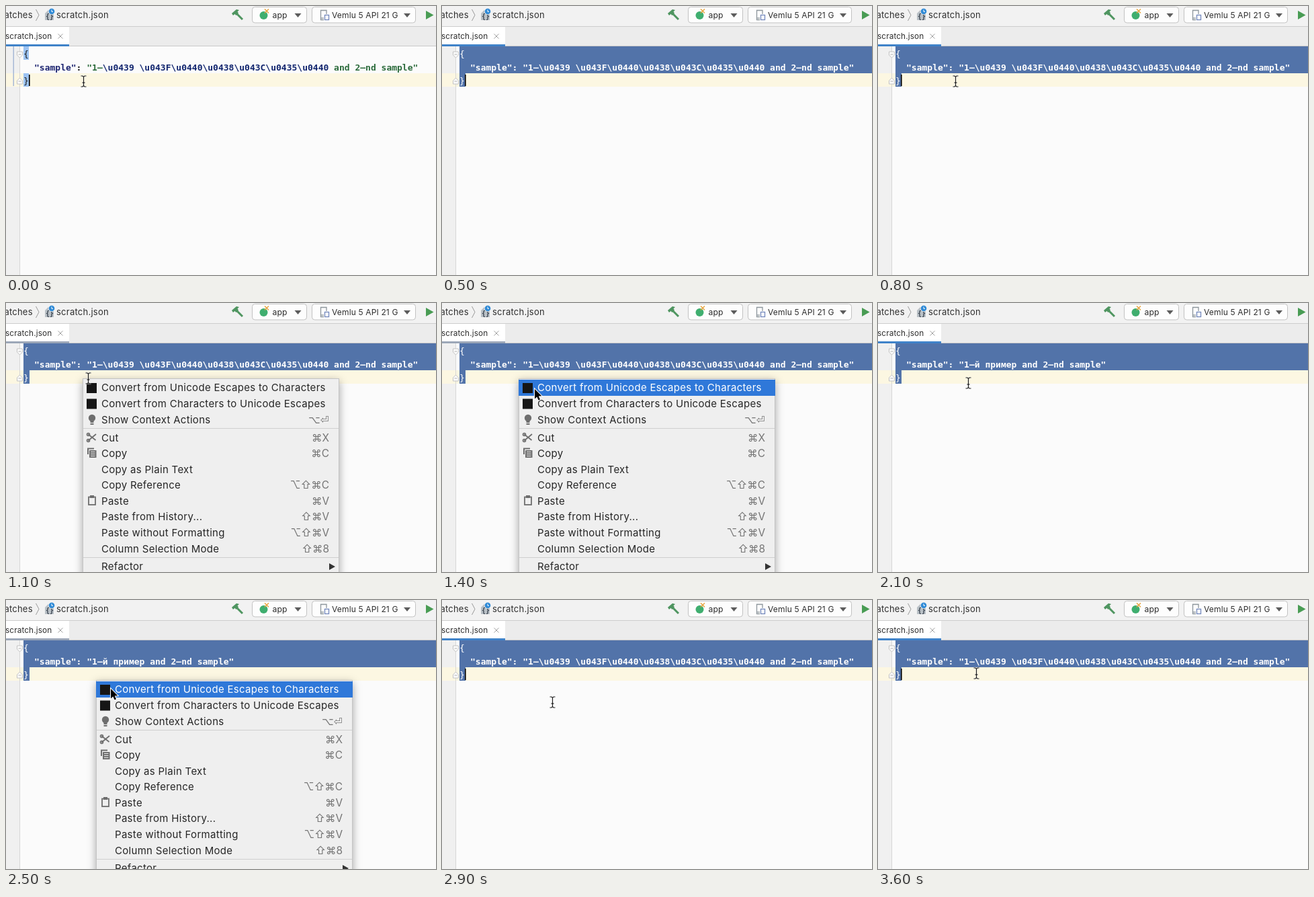
Write an HTML page with a canvas that moves like this. It is 640 px wide and 400 px high and loops after 3800 ms.

```html
<!DOCTYPE html>
<html lang="en">
<head>
<meta charset="utf-8">
<title>Unicode escapes in the editor</title>
<style>
  html, body { margin: 0; width: 100%; height: 100%; overflow: hidden; background: #fbfbfb; }
  canvas { display: block; width: 640px; height: 400px; }
</style>
</head>
<body>
<canvas id="stage" width="640" height="400"></canvas>
<script>
const ctx = document.getElementById('stage').getContext('2d');
const LOOP = 3800, TICK = 100;
const UI = 'Inter, "DejaVu Sans", sans-serif';
const SYMBOLS = '"DejaVu Sans", sans-serif';
const MONO = '"DejaVu Sans Mono", "Liberation Mono", monospace';
const ROW = 23.6, MENU_W = 382;

const ESCAPED = '\\u0439 \\u043F\\u0440\\u0438\\u043C\\u0435\\u0440';
const PLAIN = 'й пример';

// time, x, y of the pointer
const PATH = [
  [0, 115, 112], [1000, 115, 112], [1100, 122, 112], [1200, 133, 122],
  [1300, 138, 128], [1400, 138, 128], [1500, 137, 126], [1700, 134, 119],
  [2200, 134, 119], [2300, 138, 123], [2500, 156, 132], [2600, 162, 150],
  [2700, 165, 154], [2900, 164, 152], [3200, 163, 149], [3600, 146, 109], [3800, 146, 109]
];
const MENUS = [
  { from: 1000, to: 1500, x: 114, y: 113 },
  { from: 2200, to: 2800, x: 134, y: 120 }
];
const CARET_ON = [[0, 200], [500, 1000], [1500, 2100], [2800, 3300], [3600, 3800]];

// label, shortcut, centre offset from the menu top
const ITEMS = [
  ['Convert from Unicode Escapes to Characters', '', 13.3],
  ['Convert from Characters to Unicode Escapes', '', 37],
  ['Show Context Actions', '⌥⏎', 61],
  ['Cut', '⌘X', 87.5],
  ['Copy', '⌘C', 111],
  ['Copy as Plain Text', '', 134.7],
  ['Copy Reference', '⌥⇧⌘C', 158.3],
  ['Paste', '⌘V', 181.8],
  ['Paste from History...', '⇧⌘V', 205.3],
  ['Paste without Formatting', '⌥⇧⌘V', 229],
  ['Column Selection Mode', '⇧⌘8', 252.5],
  ['Refactor', '', 279]
];

const within = (t, a, b) => t >= a && t < b;

function rect(x, y, w, h, color) {
  ctx.fillStyle = color;
  ctx.fillRect(x, y, w, h);
}

function text(s, x, y, font, color, align = 'left', spacing = 0) {
  ctx.font = font;
  ctx.letterSpacing = spacing + 'px';
  ctx.fillStyle = color;
  ctx.textAlign = align;
  ctx.fillText(s, x, y);
}

function trace(points, closed) {
  ctx.beginPath();
  points.forEach(([x, y], i) => i ? ctx.lineTo(x, y) : ctx.moveTo(x, y));
  if (closed) ctx.closePath();
}

function poly(points, color) {
  trace(points, true);
  ctx.fillStyle = color;
  ctx.fill();
}

function line(points, color, width = 1, closed = false) {
  trace(points, closed);
  ctx.strokeStyle = color;
  ctx.lineWidth = width;
  ctx.stroke();
}

function disc(x, y, r, color) {
  ctx.beginPath();
  ctx.arc(x, y, r, 0, Math.PI * 2);
  ctx.fillStyle = color;
  ctx.fill();
}

function ring(x, y, r, color, width) {
  ctx.beginPath();
  ctx.arc(x, y, r, 0, Math.PI * 2);
  ctx.strokeStyle = color;
  ctx.lineWidth = width;
  ctx.stroke();
}

function cross(x, y, r, color, width) {
  line([[x - r, y - r], [x + r, y + r]], color, width);
  line([[x + r, y - r], [x - r, y + r]], color, width);
}

function combo(x, w, arrowX) {
  ctx.beginPath();
  ctx.roundRect(x + 0.5, 1.5, w, 23.5, 4);
  ctx.fillStyle = '#fdfdfd';
  ctx.fill();
  ctx.strokeStyle = '#c2c2c2';
  ctx.lineWidth = 1;
  ctx.stroke();
  poly([[arrowX - 5, 11], [arrowX + 5, 11], [arrowX, 17]], '#5c5c5c');
}

function fileIcon() {
  poly([[63, 6], [71, 6], [71, 21], [58, 21], [58, 11]], '#b9c0c6');
  text('{}', 59, 19, 'bold 10px ' + MONO, '#3a4450');
  disc(68, 8, 5, '#f2f2f2');
  disc(68, 8, 4.3, '#2f8ad6');
  line([[68, 5.5], [68, 8.5], [70, 8.5]], '#fff', 1);
}

function hammer() {
  line([[343.5, 11.5], [352, 20]], '#4f9560', 3);
  poly([[336, 11], [343, 5], [347, 6], [344.5, 8.5], [346, 10.5], [342.5, 14], [340.5, 12], [338, 14]], '#4f9560');
}

function deviceIcon() {
  line([[477, 12], [477, 6.5], [468.5, 6.5], [468.5, 20.5], [473, 20.5]], '#8d969c', 1.3);
  line([[468, 18], [473, 18]], '#8d969c', 1.3);
  ctx.strokeStyle = '#7388bd';
  ctx.lineWidth = 1.3;
  ctx.strokeRect(474.5, 13.5, 6, 7);
}

function toolbar() {
  const ink = '#2e2e2e';
  rect(0, 0, 640, 30, '#f2f2f2');
  rect(0, 30, 640, 1, '#cdcdcd');
  text('atches', 39.7, 18, '13px ' + UI, ink, 'right', 0.2);
  line([[44.5, 5], [49, 13.5], [44.5, 22]], '#999', 1);
  fileIcon();
  text('scratch.json', 75, 18, '13px ' + UI, ink, 'left', 0.25);
  hammer();
  combo(366, 81, 434.5);
  disc(383.5, 14, 6, '#3fae6f');
  cross(388, 7.5, 3, '#e8a33d', 1.4);
  text('app', 396.5, 18, '12.2px ' + UI, ink, 'left', 0.15);
  combo(455, 154, 597);
  deviceIcon();
  text('Vemlu 5 API 21 G', 485, 18, '12px ' + UI, ink, 'left', 0.15);
  poly([[625, 7], [636.5, 13.5], [625, 20]], '#499c54');
}

function tabs(focused) {
  rect(0, 31, 640, 29, '#ececec');
  rect(0, 59, 640, 1, '#c9c9c9');
  rect(0, 31, 94, 26, '#ffffff');
  rect(0, 57, 94, 3, focused ? '#4083c9' : '#9ca7b8');
  text('scratch.json', -1, 49, '11.8px ' + UI, '#2e2e2e', 'left', 0.1);
  cross(81, 45, 3.5, '#a0a0a0', 1);
}

function foldMark(y, dir) {
  const p = [[16.5, y - 4 * dir], [24.5, y - 4 * dir], [24.5, y + 1 * dir], [20.5, y + 5 * dir], [16.5, y + 1 * dir]];
  poly(p, '#fbfbfb');
  line(p, '#c3c3c3', 1, true);
  line([[18.5, y], [22.5, y]], '#b0b0b0');
}

function code(parts, x, y, selected) {
  for (const [s, color] of parts) {
    text(s, x, y, 'bold 13px ' + MONO, selected ? '#ffffff' : color);
    x += ctx.measureText(s).width;
  }
}

function editor(t) {
  const selected = t >= 500;
  const body = within(t, 1500, 2800) ? PLAIN : ESCAPED;
  rect(0, 60, 640, 340, '#fbfbfb');
  rect(0, 60, 20, 340, '#f0f0f0');
  rect(0, 100, 640, 20, '#fcf7e2');
  rect(20, 60, 1, 340, '#d6d6d6');
  if (selected) {
    rect(26, 60, 614, 40, '#5273a9');
    rect(26, 100, 9, 20, '#5273a9');
  } else {
    rect(10.5, 60, 1.5, 59, '#a6b8d6');
    rect(26, 60, 8, 20, '#9cc3f2');
    rect(26, 100, 8, 20, '#9cc3f2');
  }
  foldMark(72, 1);
  foldMark(112, -1);
  const brace = selected ? '#ffffff' : '#1a1a1a';
  text('{', 26, 75.5, '13px ' + MONO, brace);
  text('}', 26, 115.5, '13px ' + MONO, brace);
  code([
    ['"sample"', '#1c2470'], [': ', '#1a1a1a'], ['"1–', '#2a6a3a'],
    [body, '#12266f'], [' and 2–nd sample"', '#2a6a3a']
  ], 42, 96, selected);
  if (CARET_ON.some(([a, b]) => within(t, a, b))) rect(34, 102, 1.6, 17, '#000');
}

function menuIcons() {
  const gray = '#6e6e6e';
  rect(6, 6, 15, 15, '#161616');
  rect(6, 29.5, 15, 15, '#161616');

  disc(14, 58, 5.2, gray);
  rect(11.5, 62, 5, 3, gray);
  rect(11.5, 66, 5, 2, gray);

  line([[8, 82], [19.5, 91]], gray, 1.8);
  line([[8, 92], [20, 82]], gray, 1.8);
  ring(8.5, 82.5, 2, gray, 1.6);
  ring(8.5, 91.5, 2, gray, 1.6);

  line([[8, 112], [8, 103.5], [17, 103.5]], gray, 2);
  rect(10, 106, 10.5, 11, gray);
  for (let i = 0; i < 3; i++) rect(12, 108 + i * 3, 6.5, 1, '#efefef');

  ctx.strokeStyle = gray;
  ctx.lineWidth = 1.8;
  ctx.strokeRect(9, 175.5, 10, 11.5);
  rect(11, 173, 6, 4, gray);
}

function menu(m, py, arrow) {
  ctx.save();
  ctx.translate(m.x, m.y);
  ctx.shadowColor = 'rgba(0,0,0,0.35)';
  ctx.shadowBlur = 12;
  ctx.shadowOffsetY = 4;
  rect(0, -1, MENU_W, 421, '#efefef');
  ctx.shadowColor = 'transparent';
  ctx.strokeStyle = '#c4c4c4';
  ctx.lineWidth = 1;
  ctx.strokeRect(0.5, -0.5, MENU_W - 1, 421);

  const hot = arrow ? Math.floor((py - m.y - 2) / ROW) : -1;
  if (hot >= 0) rect(0, Math.round(1 + hot * ROW), MENU_W, 24, '#2f78d9');
  rect(1, 73, MENU_W - 2, 1, '#cfcfcf');
  rect(1, 265, MENU_W - 2, 1, '#cfcfcf');
  menuIcons();
  ITEMS.forEach(([label, keys, y], i) => {
    const base = Math.round(y + 5);
    text(label, 28, base, '15px ' + UI, i === hot ? '#ffffff' : '#262626', 'left', 0.3);
    const face = keys.includes('⏎') ? SYMBOLS : UI;
    if (keys) text(keys, 367, base, '15.4px ' + face, '#757575', 'right');
  });
  poly([[367, 274], [376, 279], [367, 284]], '#333');
  ctx.restore();
}

function ibeam(x, y) {
  x += 0.5;
  const strokes = [
    [[x - 4, y - 8], [x - 1.5, y - 8], [x, y - 6.5], [x + 1.5, y - 8], [x + 4, y - 8]],
    [[x, y - 6.5], [x, y + 6.5]],
    [[x - 4, y + 8], [x - 1.5, y + 8], [x, y + 6.5], [x + 1.5, y + 8], [x + 4, y + 8]],
    [[x - 2, y + 2], [x + 2, y + 2]]
  ];
  strokes.forEach(s => line(s, 'rgba(255,255,255,0.5)', 2.4));
  strokes.forEach(s => line(s, '#1c1c1c', 1.2));
}

function arrowPointer(x, y) {
  const p = [[0, 0], [0, 14.5], [3.3, 11.4], [5.6, 16.6], [8, 15.5], [5.8, 10.5], [10.3, 10.3]]
    .map(([a, b]) => [x + a, y + b]);
  line(p, '#ffffff', 2, true);
  poly(p, '#000000');
}

function pointerAt(t) {
  const i = PATH.findIndex(p => p[0] > t);
  const [t0, x0, y0] = PATH[i - 1], [t1, x1, y1] = PATH[i];
  const k = (t - t0) / (t1 - t0);
  return [x0 + (x1 - x0) * k, y0 + (y1 - y0) * k];
}

function draw(t) {
  const [x, y] = pointerAt(t);
  const open = MENUS.find(m => within(t, m.from, m.to));
  const arrow = !!open && y > open.y + 2;
  toolbar();
  tabs(!open);
  editor(t);
  if (open) menu(open, y, arrow);
  if (arrow) arrowPointer(x, y);
  else if (!within(t, 500, 800)) ibeam(x, y);
}

const start = performance.now();
function loop() {
  const t = (performance.now() - start) % LOOP;
  draw(Math.floor(t / TICK) * TICK);
  requestAnimationFrame(loop);
}
loop();
</script>
</body>
</html>
```
